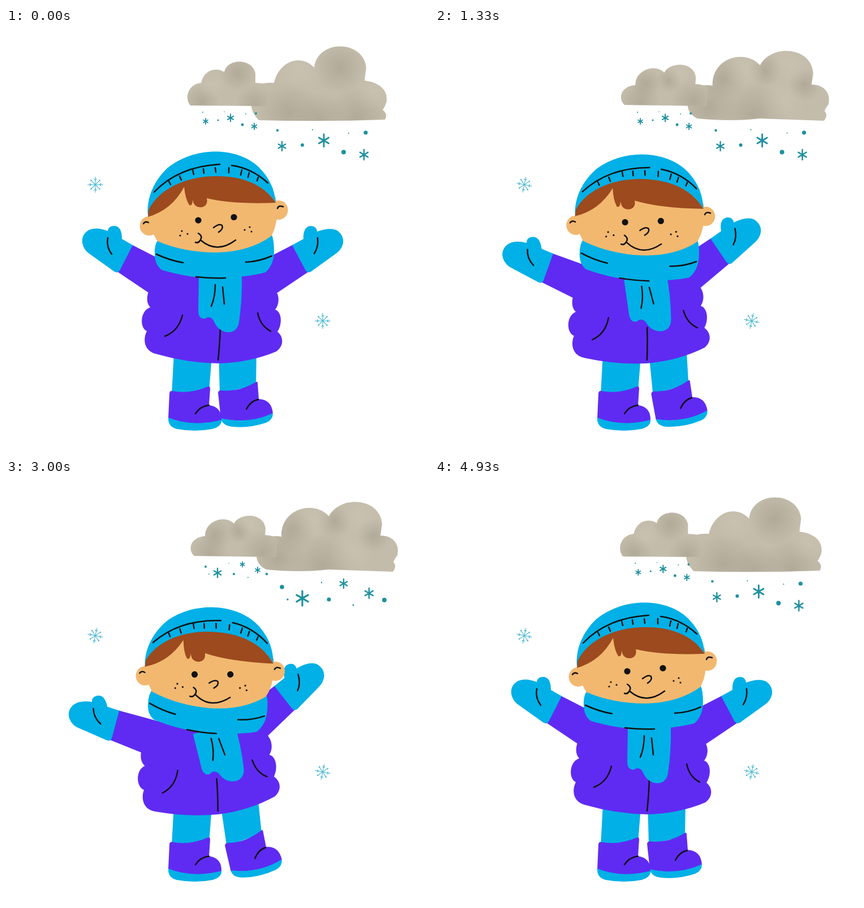
Animation of 748x748 px, one loop 5.01 s. Source, as an HTML page with a canvas:

```html
<!DOCTYPE html>
<html lang="en">
<head>
<meta charset="utf-8">
<title>Snowy day</title>
<style>
html, body { margin: 0; width: 100%; height: 100%; overflow: hidden; background: #fff; }
canvas { display: block; width: 100vw; height: 100vh; }
</style>
</head>
<body>
<canvas id="stage" width="748" height="748"></canvas>
<script>
const ctx = document.getElementById('stage').getContext('2d');
const LOOP = 5010, CLOUD_STEP = 293;
const BLUE = '#00b0e6', PURPLE = '#5f2bf2', SKIN = '#f2b870', HAIR = '#9c4a1e',
      INK = '#111', SNOW = '#1f909f', FROST = '#45b5cf';

const paths = new Map();
function path(d) {
  if (!paths.has(d)) paths.set(d, new Path2D(d));
  return paths.get(d);
}
function fill(color, d) {
  ctx.fillStyle = color;
  ctx.fill(path(d));
}
function ink(d, width = 2.5, color = INK) {
  ctx.strokeStyle = color;
  ctx.lineWidth = width;
  ctx.stroke(path(d));
}
function oval(color, x, y, rx, ry = rx) {
  ctx.fillStyle = color;
  ctx.beginPath();
  ctx.ellipse(x, y, rx, ry, 0, 0, 7);
  ctx.fill();
}
function turned(x, y, angle, draw) {
  ctx.save();
  ctx.translate(x, y);
  ctx.rotate(angle);
  ctx.translate(-x, -y);
  draw();
  ctx.restore();
}
function shifted(dx, draw) {
  ctx.save();
  ctx.translate(dx, 0);
  draw();
  ctx.restore();
}

// Boy
function leftLeg() {
  fill(BLUE, 'M297 575L293 648L359 643L364 580Z');
  fill(PURPLE, 'M289 646Q290 641 294 642Q325 648 357 634Q361 633 361 638L359 667Q382 670 381 694Q340 712 287 690Z');
  fill(BLUE, 'M287 689Q330 706 381 693Q382 704 365 709Q335 715 302 709Q286 705 287 689Z');
  ink('M335 682Q343 669 359 667');
}
function rightLeg() {
  fill(BLUE, 'M376 570L378 646L442 632L443 570Z');
  fill(PURPLE, 'M375 645Q376 640 382 641Q412 644 442 626Q445 624 445 629L447 656Q470 657 472 682Q435 701 380 691Z');
  fill(BLUE, 'M380 690Q430 701 472 681Q472 693 460 698Q430 708 400 705Q382 703 380 690Z');
  ink('M425 674Q433 659 446 657');
}
function torso() {
  fill(PURPLE, 'M252 466Q246 484 255 494C237 500 236 530 249 536C242 550 243 572 268 577Q320 592 375 593Q430 592 478 572C492 562 491 546 480 537C489 524 488 502 476 498C484 488 483 474 478 466L468 425L268 425Z');
  ink('M312 508Q305 536 281 545');
  ink('M445 504Q450 527 468 536');
  ink('M379 530Q378 560 375 587');
}
function leftArm() {
  fill(PURPLE, 'M222 383L197 431L252 468L305 480L300 423Z');
  fill(BLUE, 'M224 384L205 373Q205 350 191 350Q181 350 180 359Q160 351 147 357Q133 365 135 380Q137 393 150 401L192 431Q198 434 201 429Z');
  ink('M180 371Q177 387 187 400');
}
function rightArm() {
  fill(PURPLE, 'M508 383L535 431L480 468L440 480L430 423Z');
  fill(BLUE, 'M506 384L526 373Q525 351 539 350Q549 350 550 360Q575 351 587 359Q598 368 596 381Q593 393 582 400L539 431Q534 434 530 429Z');
  ink('M551 371Q553 387 545 399');
}
function scarfTail() {
  fill(BLUE, 'M341 438L340 500Q340 515 352 514Q360 508 367 517Q374 536 392 538Q409 538 412 520Q418 480 417 438Z');
  ink('M370 454Q370 475 363 492');
  ink('M383 458L386 488');
}
function scarf() {
  fill(BLUE, 'M268 376Q262 384 263 402Q264 420 276 428Q330 444 380 442Q430 440 459 432Q474 418 474 395Q474 375 470 366Z');
  ink('M266 400Q290 411 313 415');
  ink('M424 414Q448 413 470 403');
  ink('M336 440Q362 443 388 442');
}
function head() {
  oval(SKIN, 253, 350, 16.5, 17);
  oval(SKIN, 482, 322, 16.5, 17);
  fill(SKIN, 'M252 322Q254 358 268 377Q315 397 372 397Q430 396 469 368Q484 342 477 300L440 268L300 268Z');
  fill(BLUE, 'M251 332C248 300 262 270 285 248C333 209 408 209 447 246C466 265 475 285 477 309C455 275 415 263 375 263C320 262 270 285 251 332Z');
  fill(HAIR, 'M251 334Q293 322 315 281Q317 302 324 313Q330 316 330 303Q332 318 346 317Q358 314 355 301Q400 312 477 309C455 275 415 262 375 262C320 261 270 284 252 322Z');
  ink('M262 290Q305 245 378 241M399 243Q435 248 463 274');
  ink('M288 271L291 277M307 262L310 269M330 251L332 259M349 249L350 257M370 247L371 255M394 247L394 256M417 251L415 260M430 256L428 264M446 264L444 270');
  ink('M243 346Q246 341 252 344M480 319Q482 313 490 316');
  oval(INK, 340, 340, 5.6);
  oval(INK, 403, 334.5, 5.6);
  ink('M367 353Q377 345 382 349Q385 355 376 361');
  ink('M344 375Q373 400 406 375M340 363Q349 368 343 376Q340 381 335 379');
  for (const [x, y] of [[311, 359], [308, 367], [321, 364], [431, 352], [422, 357], [434, 360]]) oval(INK, x, y, 1.6);
}
function boy(sway) {
  turned(408, 545, -.132 * sway, rightLeg);
  leftLeg();
  turned(375, 590, -.118 * sway, torso);
  turned(334, 510, -.232 * sway, leftArm);
  turned(388, 555, -.193 * sway, rightArm);
  turned(385, 484, -.29 * sway, scarfTail);
  turned(295, 275, .106 * sway, scarf);
  turned(272, 268, .096 * sway, head);
}

// Clouds: two drawings of each, with soft shading as [x, y, radius, tone]
const DARK = '154,145,128', PALE = '207,200,184';
const bigClouds = [
  { d: 'M447 163Q436 152 434 140L438 110Q446 95 474 97C482 60 520 44 545 70C550 20 632 20 637 70L634 93C660 96 676 110 673 130Q670 140 666 145Q676 152 670 162Q560 166 447 163Z',
    home: 0, shade: [[590, 70, 45, DARK], [500, 150, 55, DARK], [620, 160, 55, DARK], [555, 160, 45, DARK], [520, 75, 40, PALE], [650, 112, 35, PALE]] },
  { d: 'M460 160Q444 152 443 137L450 112Q462 98 487 102C485 52 545 36 571 66C590 28 662 32 665 80L662 100C684 100 697 115 692 135Q686 143 685 147Q692 154 684 164L570 160Q520 166 460 160Z',
    home: 12.8, shade: [[505, 90, 40, DARK], [580, 75, 30, DARK], [480, 140, 50, DARK], [650, 100, 30, DARK], [560, 155, 60, DARK], [545, 75, 35, PALE], [625, 65, 40, PALE], [610, 130, 40, PALE]] }
];
const smallClouds = [
  { d: 'M326 137C316 125 320 100 345 97C350 75 370 68 386 78C390 54 435 52 441 80L441 97Q458 97 465 103L462 138Z',
    home: 0, shade: [[410, 80, 32, DARK], [345, 132, 32, DARK], [440, 135, 35, DARK], [365, 100, 25, PALE]] },
  { d: 'M333 136C321 126 325 103 352 101C352 73 388 63 403 79C412 60 456 58 459 88L458 99Q474 100 480 106L478 138Z',
    home: 7.8, shade: [[370, 98, 28, DARK], [412, 92, 22, DARK], [360, 133, 35, DARK], [455, 130, 40, DARK], [430, 80, 24, PALE]] }
];
function cloud(c, dx) {
  shifted(dx - c.home, () => {
    fill('#c3bcab', c.d);
    ctx.clip(path(c.d));
    for (const [x, y, r, tone] of c.shade) {
      const g = ctx.createRadialGradient(x, y, 0, x, y, r);
      g.addColorStop(0, `rgba(${tone},.42)`);
      g.addColorStop(1, `rgba(${tone},0)`);
      ctx.fillStyle = g;
      ctx.fillRect(x - r, y - r, 2 * r, 2 * r);
    }
  });
}

// Snow under the clouds: [x, y, radius]; two drawings per cloud
const bigSnow = [
  { home: 0,
    stars: [[488, 209, 8], [562, 199, 11], [633, 224, 9]],
    dots: [[480, 181, 2.2], [524, 207, 3], [542, 180, 1.1], [597, 219.5, 4], [606, 186, 1], [636, 185, 3.6]] },
  { home: 12.8,
    stars: [[524, 211, 13], [597, 185, 8], [642, 202, 9]],
    dots: [[488, 191, 3.8], [498, 213, 1.7], [558, 183, 1.2], [571, 213, 3.6], [614, 223, 1.4], [669, 214, 4]] }
];
const smallSnow = [
  { home: 0,
    stars: [[353, 165, 5], [397, 159, 6.5], [439, 174, 5.5]],
    dots: [[348, 149, 1.1], [375, 163, 1.6], [386, 148, .8], [418, 171, 2.4], [424, 152, .9], [442, 151, 2]] },
  { home: 7.8,
    stars: [[374, 166, 8], [418, 151, 4.5], [445, 161, 5]],
    dots: [[353, 155, 2.1], [359, 168, .9], [394, 149, .8], [403, 168, 2.1], [428, 174, .9], [461, 168, 2.2]] }
];
function snow({ home, stars, dots }, dx) {
  shifted(dx - home, () => {
    for (const [x, y, r] of dots) oval(SNOW, x, y, r);
    for (const [x, y, r] of stars) {
      ctx.strokeStyle = SNOW;
      ctx.lineWidth = 1 + r * .17;
      ctx.beginPath();
      for (let i = 0; i < 6; i++) {
        const a = Math.PI * (i / 3 + .5), len = i % 3 ? r * .9 : r;
        ctx.moveTo(x, y);
        ctx.lineTo(x + len * Math.cos(a), y + len * Math.sin(a));
      }
      ctx.stroke();
    }
  });
}
function crystal(x, y, tilt) {
  for (let i = 0; i < 8; i++) {
    turned(x, y, tilt + i * Math.PI / 4, () => {
      ctx.translate(x, y);
      ink(i % 2 ? 'M0 0L0 -11.5' : 'M0 0L0 -13.5M-2 -10L0 -7.5L2 -10', 1.1, FROST);
      if (i % 2) oval(FROST, 0, -10.5, 1.2);
    });
  }
}

const DRIFT = [0, 4.7, 10.4, 12.8, 16.6, 20.3, 22.8];
function sky(t) {
  const step = Math.floor(t / CLOUD_STEP) % 14;
  const k = step < 7 ? step : 13 - step;
  const drift = DRIFT[k], smallDrift = drift * .61;
  const drawing = step % 7 >= 3 ? 1 : 0;
  const fall = step < 7 ? 0 : 1;
  cloud(bigClouds[drawing], drift);
  cloud(smallClouds[drawing], smallDrift);
  snow(bigSnow[fall], drift);
  snow(smallSnow[fall], smallDrift);
  const tilt = .2 * Math.min(1, k / 2);
  crystal(158, 277, tilt);
  crystal(560, 518, tilt);
}

function render(now) {
  const t = now % LOOP;
  // The picture holds alternately for 30 and 70 ms.
  const held = Math.min(4930, Math.floor(t / 100) * 100 + (t % 100 < 30 ? 0 : 30));
  ctx.fillStyle = '#fff';
  ctx.fillRect(0, 0, 748, 748);
  ctx.lineCap = ctx.lineJoin = 'round';
  sky(held);
  boy((1 - Math.cos(2 * Math.PI * held / 4990)) / 2);
}
const start = performance.now();
function tick() {
  render(performance.now() - start);
  requestAnimationFrame(tick);
}
tick();
</script>
</body>
</html>
```
